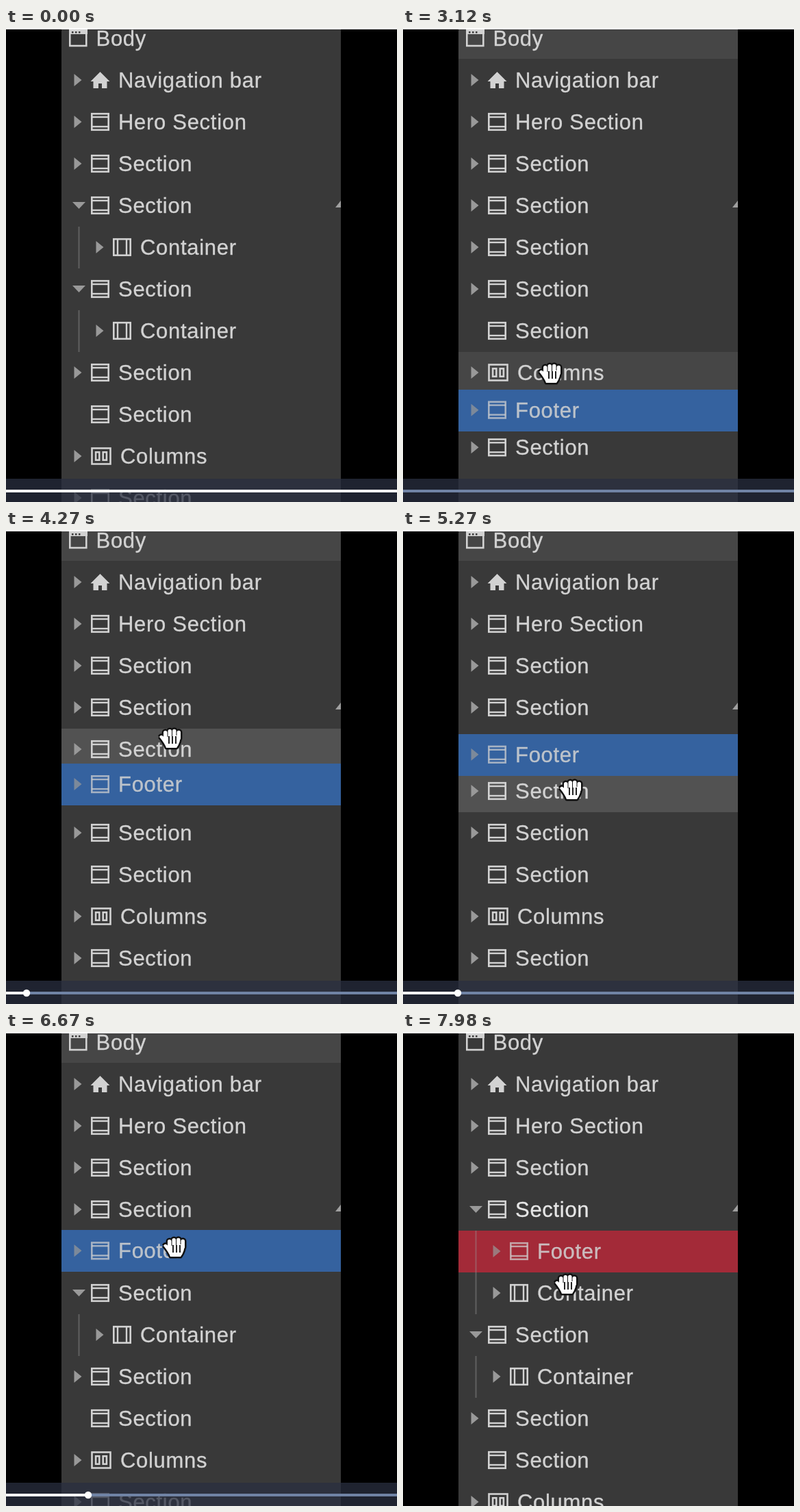
Animation, 571 px wide and 692 px high, one loop 8000 ms. Source, as an HTML page with a canvas:

```html
<!DOCTYPE html>
<html lang="en">
<head>
<meta charset="utf-8">
<title>Layer tree drag</title>
<style>
html, body { margin: 0; width: 100%; height: 100%; overflow: hidden; background: #000; }
canvas { display: block; }
</style>
</head>
<body>
<canvas id="stage" width="571" height="692"></canvas>
<script>
const c = document.getElementById('stage').getContext('2d');
const LOOP = 8000, ROW = 61, TOP = 76, START = 1360, GRAB = 2430, OPEN = 7300, NEST = 7830;
const LIGHT = '#d2d2d2', PANEL = '#393939', HOVER = '#464646';

// swap: when the dragged row passes this one; childSwap: when it passes the child
const rows = [
  { name: 'Navigation bar', icon: home },
  { name: 'Hero Section' },
  { name: 'Section' },
  { name: 'Section', open: t => t < START || t >= OPEN, childSwap: NEST },
  { name: 'Section', open: t => t < START || t >= 5900, swap: 4275 },
  { name: 'Section', swap: 3800 },
  { name: 'Section', swap: 3500, leaf: true },
  { name: 'Columns', icon: columns, swap: 3200 },
  { name: 'Section', swap: 2985 }
];
const dropTarget = rows[3], firstHover = rows[5];

// key points: time, then values
const handPath = [[GRAB, 207, 642], [3120, 215, 505], [4270, 240, 305],
  [5270, 245, 380], [6670, 246, 315], [7980, 238, 369]];
const knobPath = [[3900, 10], [4270, 30], [5270, 80], [6670, 120]];

function ease(t, start, length) {
  const p = Math.min(1, Math.max(0, (t - start) / length));
  return p * p * (3 - 2 * p);
}

function along(path, t) {
  return path[0].slice(1).map((first, j) => path.slice(1).reduce((v, point, i) =>
    v + (point[j + 1] - path[i][j + 1]) * ease(t, path[i][0], point[0] - path[i][0]), first));
}

const passed = (t, swap = Infinity) => ROW * ease(t, swap, 150);

function box(x, y, w, h, color) {
  c.fillStyle = color;
  c.fillRect(x, y, w, h);
}

function band(y, color) {
  box(81, Math.round(y) - 30, 408, ROW, color);
}

function poly(points, color) {
  c.beginPath();
  points.forEach(([x, y]) => c.lineTo(x, y));
  c.closePath();
  c.fillStyle = color;
  c.fill();
}

function frame(x, y, w, h) {
  c.strokeStyle = LIGHT;
  c.lineWidth = 2.6;
  c.strokeRect(x - w / 2, y - h / 2, w, h);
}

function section(x, y) {
  frame(x, y, 24.4, 23.6);
  for (const side of [-1, 1]) box(x - 12, y + side * 7 - 1.2, 24, 2.4, LIGHT);
}

function container(x, y) {
  frame(x, y, 24.4, 23.6);
  for (const side of [-1, 1]) box(x + side * 6.5 - 1.2, y - 12, 2.4, 24, LIGHT);
}

function columns(x, y) {
  frame(x + 1.5, y, 27, 23);
  for (const side of [-1, 1]) frame(x + 1.5 + side * 5.3, y, 5.2, 11.5);
}

function home(x, y) {
  poly([[x, y - 12], [x + 14, y + 2], [x + 10, y + 2], [x + 10, y + 12], [x - 10, y + 12],
    [x - 10, y + 2], [x - 14, y + 2]], LIGHT);
  box(x - 2.5, y + 5, 5, 7, PANEL);
}

function label(text, x, y, color = LIGHT) {
  c.font = '31px "Liberation Sans", Arial, sans-serif';
  c.letterSpacing = '0.7px';
  c.fillStyle = c.strokeStyle = color;
  c.lineWidth = 0.35;
  c.fillText(text, x, y + 11);
  c.strokeText(text, x, y + 11);
}

function drawRow({ name, icon = section, leaf }, y, { indent = 0, open, color, fade = 1 } = {}) {
  const x = indent * 32;
  c.globalAlpha = fade;
  if (!leaf) {
    poly(open ? [[97, y - 5], [116, y - 5], [106.5, y + 5]]
      : [[x + 99.5, y - 9], [x + 110.5, y], [x + 99.5, y + 9]], '#999');
  }
  icon(x + 137.5, y);
  c.globalAlpha = 1;
  label(name, x + (icon === columns ? 167 : 164), y, color);
}

function guide(y) {
  box(105.5, y - 30, 2, ROW, 'rgba(150,150,150,.42)');
}

function layout(t) {
  const list = [];
  let y = TOP, footer = 0;
  for (const row of rows) {
    const shift = passed(t - 30, row.swap), open = row.open?.(t);
    list.push({ row, y: y + shift, open });
    y += ROW;
    footer -= passed(t, row.swap);
    if (open) {
      const own = row.childSwap ? passed(t, row.childSwap) : shift;
      list.push({ row: { name: 'Container', icon: container }, y: y + own, indent: 1 });
      y += ROW;
      footer -= row.childSwap ? own : shift;
    }
  }
  return { list, footer: y + footer };
}

function drawPointer(t) {
  const away = Math.sin(Math.PI * ease(t, 1750, 530));
  c.save();
  c.translate(209 - 39 * away, 629 - 14 * away);
  poly([[0, 0], [0, 34], [8, 27], [14.5, 43], [22, 40], [15.5, 25.5], [27, 25.5]], '#0a0a0a');
  c.strokeStyle = '#e8e8e8';
  c.lineWidth = 2.2;
  c.stroke();
  c.restore();
}

function drawHand(x, y) {
  c.save();
  c.translate(x, y);
  c.beginPath();
  for (let i = 0; i < 4; i++) c.roundRect(-10 + 6.5 * i, -12 - 2.5 * Math.sin(i), 5.5, 14, 2.7);
  c.moveTo(-16, -3);
  c.quadraticCurveTo(-13, -8, -9, -2);
  c.lineTo(15, -6);
  c.quadraticCurveTo(15, 5, 9, 13);
  c.lineTo(-6, 13);
  c.quadraticCurveTo(-8, 7, -16, -3);
  c.lineJoin = 'round';
  c.strokeStyle = '#111';
  c.lineWidth = 5;
  c.stroke();
  c.fillStyle = '#fff';
  c.fill();
  for (let i = 0; i < 3; i++) box(-3 + 5 * i, -4, 2, 11, '#222');
  c.restore();
}

function drawFooter(t, slot, handY) {
  const dragging = t >= GRAB, nested = t >= NEST;
  const lean = nested ? 0 : 0.13 * (handY - slot) * ease(t, GRAB, 300);
  const y = slot + lean;
  if (dragging) band(y, nested ? '#a32a38' : '#35629f');
  else if (t >= 1500) band(y, HOVER);
  drawRow({ name: 'Footer' }, y, {
    indent: nested ? 1 : 0,
    fade: dragging ? 0.72 : 1,
    color: dragging ? 'rgba(210,210,210,.86)' : LIGHT
  });
  if (nested) guide(y);
}

function drawPlayer(t) {
  c.globalAlpha = 1 - ease(t, OPEN, 150);
  box(0, 658, 571, 34, 'rgba(42,47,64,.75)');
  box(0, 674, 571, 4, t < START ? '#fff' : '#7083a5');
  if (t >= knobPath[0][0]) {
    const [x] = along(knobPath, t);
    box(0, 674, x, 4, '#fff');
    c.beginPath();
    c.arc(x, 676, 5.2, 0, 7);
    c.fill();
  }
  c.globalAlpha = 1;
}

function draw(t) {
  const { list, footer } = layout(t), [handX, handY] = along(handPath, t);
  box(0, 0, 571, 692, '#000');
  box(81, 0, 408, 692, PANEL);
  if (t >= GRAB && t < OPEN) box(81, 0, 408, 45, HOVER);

  frame(105.3, 14.5, 24, 23);
  box(92, 2, 27, 7, LIGHT);
  for (let x = 96; x < 110; x += 5) box(x, 5, 2.5, 2.5, PANEL);
  label('Body', 131.5, 15);

  for (const { row, y, open, indent } of list) {
    const first = t >= START && t < 1500 && row === firstHover;
    const over = t >= GRAB && t < NEST && Math.abs(y - handY) < ROW / 2;
    const bright = first || (t >= NEST && row === dropTarget);
    if (first || over) band(y, t < 3300 ? HOVER : '#525252');
    if (indent) guide(y);
    drawRow(row, y, { open, indent, color: bright ? '#e6e6e6' : LIGHT });
  }
  poly([[489, 252], [489, 262], [481, 262]], '#a0a0a0');

  if (t >= START) {
    drawFooter(t, footer, handY);
    if (t < GRAB) drawPointer(t);
    else drawHand(handX, handY);
  }
  drawPlayer(t);
  box(0, 0, 571, 2, '#fff');
}

function tick() {
  draw(performance.now() % LOOP);
  requestAnimationFrame(tick);
}
tick();
</script>
</body>
</html>
```
